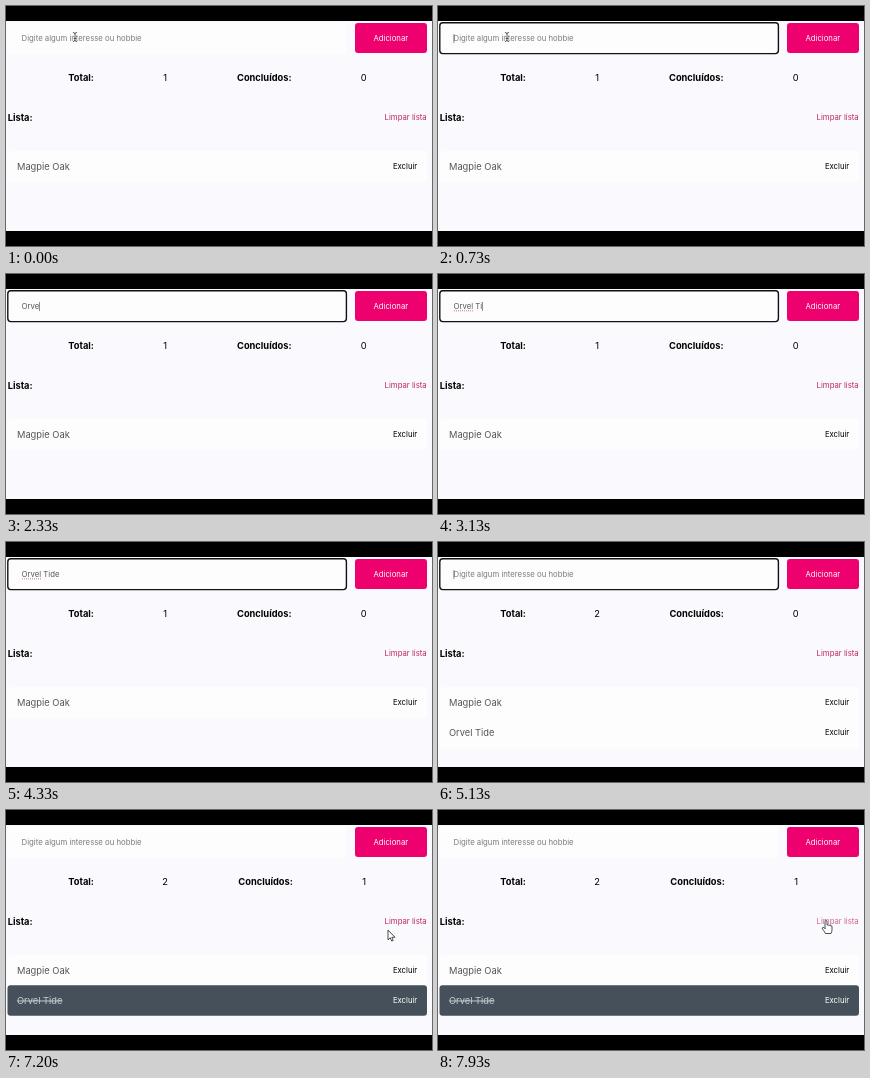
Write an HTML page that moves like this. It is 426x240 px and loops after 8 s.

```html
<!DOCTYPE html>
<html lang="pt-BR">
<head>
<meta charset="utf-8">
<title>Lista de interesses</title>
<style>
  html, body { margin: 0; width: 100%; height: 100%; overflow: hidden; background: #000; }
  svg { display: block; width: 100vw; height: 100vh; }
  text { font: 9.3px Inter, sans-serif; white-space: pre; fill: #000; }
  .bold { font-weight: 700; }
  .small { font-size: 7.75px; }
  .hint { fill: #7b7b7b; }
  .name { fill: #555; }
  .end { text-anchor: end; }
  .mid { text-anchor: middle; }
  .card { fill: #fdfdfd; filter: drop-shadow(0 1.8px 0 #fdfdfd); }
  .done rect { fill: #46505a; filter: none; }
  .done text { fill: #fff; }
  .done .name { fill: #c9cdd1; text-decoration: line-through; }
  .cursor { stroke-linejoin: round; stroke-linecap: round; }
</style>
</head>
<body>
<svg viewBox="0 0 426 240">
  <rect width="426" height="240"/>
  <rect y="15" width="426" height="210" fill="#f9f9fe"/>

  <rect id="field" class="card" x="1.8" y="16.8" width="338.6" height="30.8" rx="3" stroke-width="1.4"/>
  <text id="hint" class="small hint" x="15.6" y="35.2">Digite algum interesse ou hobbie</text>
  <text id="typed" class="small name" x="15.6" y="35.2"></text>
  <line id="spell" x1="16" y1="36.8" y2="36.8" stroke="#c8605c" stroke-width="0.8" stroke-dasharray="1 1"/>
  <rect id="caret" y="28" width="0.6" height="9" fill="#444"/>

  <rect x="349" y="17" width="72" height="30" rx="3" fill="#ee006e"/>
  <text class="small mid" x="384.8" y="35.2" style="fill:#fff">Adicionar</text>

  <text class="bold" x="62.3" y="75.2">Total:</text>
  <text id="total" class="mid" x="159.2" y="75.2"></text>
  <text id="doneLabel" class="bold" y="75.2">Concluídos:</text>
  <text id="doneCount" class="mid" x="357.6" y="75.2"></text>

  <text class="bold" x="1.7" y="115">Lista:</text>
  <text id="clear" class="small end" x="420.7" y="114.2" style="fill:#c02665">Limpar lista</text>

  <g transform="translate(0 145)">
    <rect class="card" x="1.5" width="419.5" height="30.5" rx="3"/>
    <text class="name" x="11" y="18.7">Magpie Oak</text>
    <text class="small end" x="411.3" y="18.2">Excluir</text>
  </g>
  <g id="added" transform="translate(0 175.3)">
    <rect class="card" x="1.5" width="419.5" height="30.5" rx="3"/>
    <text id="addedName" class="name" x="11" y="18.7"></text>
    <text class="small end" x="411.3" y="18.2">Excluir</text>
  </g>

  <g id="beam" class="cursor" fill="none">
    <path d="M-1.7-4.5Q0-4.5 0-3.2Q0-4.5 1.7-4.5M0-3.2V3.2M-1.7 4.5Q0 4.5 0 3.2Q0 4.5 1.7 4.5" stroke="#fff" stroke-width="1.6"/>
    <path d="M-1.7-4.5Q0-4.5 0-3.2Q0-4.5 1.7-4.5M0-3.2V3.2M-1.7 4.5Q0 4.5 0 3.2Q0 4.5 1.7 4.5M-1 1.4H1" stroke="#222" stroke-width="0.7"/>
  </g>
  <path id="arrow" class="cursor" d="M0 0V9.3L2.2 7.3L3.7 10.6L5.2 9.9L3.8 6.8H6.6Z" fill="#fff" stroke="#222" stroke-width="0.8"/>
  <path id="hand" class="cursor" d="M-1 6.5V1Q-1 0 0 0Q1 0 1 1V4.6Q2 3.6 2.8 4.8Q4 4 4.4 5.4Q6 4.8 6 6.4V9Q6 11 5 13H-.6Q-1.4 10.8-3.6 8.4Q-4 7-2.8 6.8Q-1.8 6.8-1 8Z" fill="#fff" stroke="#222" stroke-width="0.8"/>
</svg>
<script>
const LOOP = 8000, FOCUS = 580, TYPE = 1750, KEY = 180, ENTER = 5000, DONE = 6280;
const TITLE = 'Orvel Tide', TEXT_X = 15.6;
const $ = id => document.getElementById(id);
const show = (id, on) => $(id).style.display = on ? '' : 'none';
const ease = p => p * p * (3 - 2 * p);

// Pointer stops: time, x, y
const stops = [
  [0, 69, 31], [5300, 69, 31], [5850, 72.5, 175.6], [6400, 72.5, 176],
  [7150, 382, 120.5], [7250, 382, 120.5], [7600, 388, 110.5], [LOOP, 388, 110.5]
];

function pointerAt(t) {
  const i = stops.findIndex(s => s[0] > t);
  const [a, b] = [stops[i - 1], stops[i]];
  const p = ease((t - a[0]) / (b[0] - a[0]));
  return [a[1] + (b[1] - a[1]) * p, a[2] + (b[2] - a[2]) * p];
}

function drawPointer(t) {
  const [x, y] = pointerAt(t);
  const onClear = x > 378 && y > 106 && y < 118;
  const onItem = y > 145 && y < 206;
  const onField = x < 340 && y < 48;
  const kind = onField ? 'beam' : onItem || onClear ? 'hand' : 'arrow';
  const visible = t < 1100 || t >= 5300;
  for (const id of ['beam', 'arrow', 'hand']) {
    show(id, visible && id === kind);
    $(id).setAttribute('transform', `translate(${x} ${y})`);
  }
  $('clear').style.opacity = onClear ? 0.7 : 1;
}

function drawField(t) {
  const focused = t >= FOCUS && t < DONE;
  $('field').setAttribute('stroke', focused ? '#111' : 'none');

  const keys = Math.max(0, Math.min(TITLE.length, Math.floor((t - TYPE) / KEY) + 1));
  const count = t < ENTER ? keys : 0;
  const typed = $('typed');
  typed.textContent = TITLE.slice(0, count);
  show('hint', !count);

  const word = TITLE.indexOf(' ');
  show('spell', count > word);
  if (count > word) $('spell').setAttribute('x2', TEXT_X + typed.getSubStringLength(0, word));

  const lastKey = t >= ENTER ? ENTER : keys ? TYPE + (keys - 1) * KEY : FOCUS;
  show('caret', focused && (t - lastKey) % 1000 < 500);
  $('caret').setAttribute('x', TEXT_X + (count ? typed.getComputedTextLength() : 0));
}

function draw(t) {
  const added = t >= ENTER, done = t >= DONE;
  drawField(t);
  show('added', added);
  $('added').setAttribute('class', done ? 'done' : '');
  $('total').textContent = added ? 2 : 1;
  $('doneCount').textContent = done ? 1 : 0;
  $('doneCount').setAttribute('x', done ? 358.2 : 357.6);
  $('doneLabel').setAttribute('x', done ? 232.3 : added ? 231.4 : 231);
  drawPointer(t);
}

$('addedName').textContent = TITLE;
const start = performance.now();
function tick() {
  draw((performance.now() - start) % LOOP);
  requestAnimationFrame(tick);
}
tick();
</script>
</body>
</html>
```
